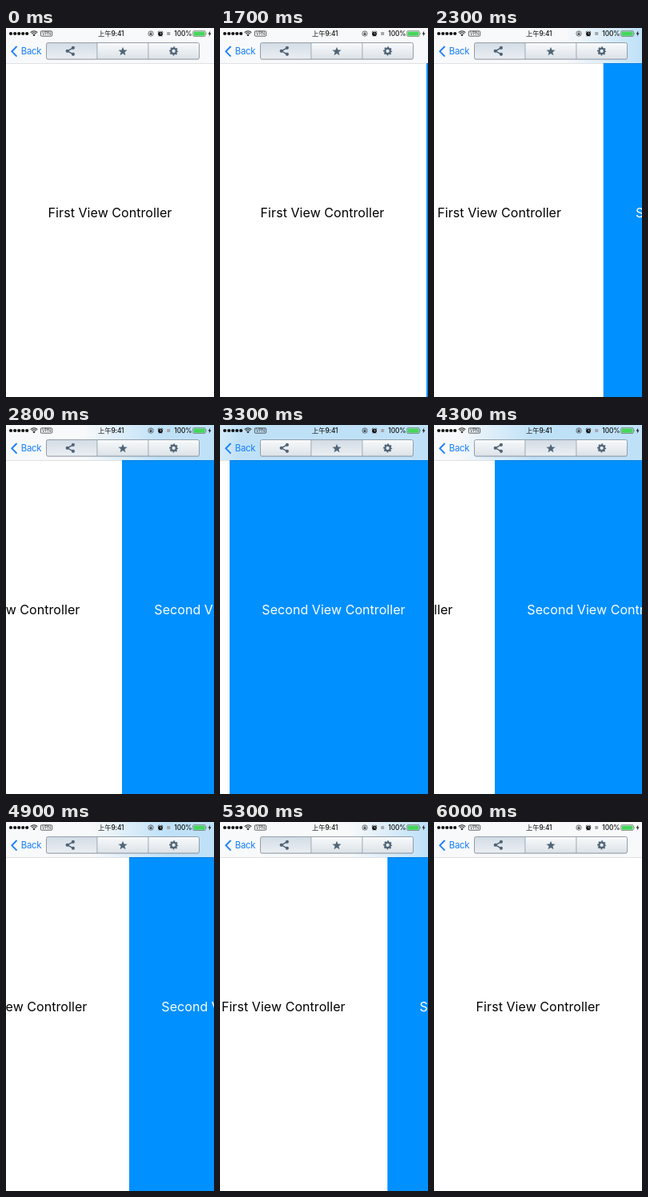
These frames come from a looping animation (260x462 px, 6300 ms). An HTML page:

```html
<!DOCTYPE html>
<html lang="en">
<head>
<meta charset="utf-8">
<title>Swipe between view controllers</title>
<style>
  html, body { margin: 0; width: 100%; height: 100%; overflow: hidden; background: #fff; }
  svg { display: block; width: 260px; height: 462px; }
  text { font-family: Inter, "Noto Sans CJK SC", "Noto Sans CJK", sans-serif; }
  .title { font-size: 16px; letter-spacing: .06px; text-anchor: middle; }
  .status { font-size: 8.3px; font-weight: 500; letter-spacing: -.1px; fill: #111; }
  .vpn { font-size: 5.6px; letter-spacing: -.1px; text-anchor: middle; fill: #333; }
  .back { font-size: 11.3px; letter-spacing: -.2px; fill: #147efb; }
  .icon { fill: #4f6477; stroke: #4f6477; stroke-width: 0; }
  .line { fill: none; stroke: #222; stroke-width: .8; }
</style>
</head>
<body>
<svg viewBox="0 0 260 462">
  <defs>
    <linearGradient id="tint" gradientUnits="userSpaceOnUse" x1="260" x2="308" y1="0" y2="0">
      <stop offset="0" stop-color="#f8f9fa"/>
      <stop offset="1" stop-color="#bfe1f8"/>
    </linearGradient>
    <linearGradient id="button" x2="0" y2="1">
      <stop offset="0" stop-color="#f8fafb"/>
      <stop offset="1" stop-color="#dce2e8"/>
    </linearGradient>
    <linearGradient id="pressed" x2="0" y2="1">
      <stop offset="0" stop-color="#d3dce5"/>
      <stop offset="1" stop-color="#ebeff3"/>
    </linearGradient>
  </defs>

  <rect width="260" height="462" fill="#fff"/>
  <g id="pages" transform="translate(0 0)">
    <text class="title" x="130" y="237.4">First View Controller</text>
    <rect x="260" width="260" height="462" fill="#0090ff"/>
    <text class="title" x="390" y="237.4" fill="#fff">Second View Controller</text>
  </g>

  <rect width="260" height="44" fill="url(#tint)"/>
  <rect y="44" width="260" height=".6" fill="#000" opacity=".2"/>

  <!-- status bar -->
  <g fill="#111">
    <circle cx="6" cy="7" r="2.1"/><circle cx="11.2" cy="7" r="2.1"/>
    <circle cx="16.2" cy="7" r="2.1"/><circle cx="21.2" cy="7" r="2.1"/>
    <circle cx="26.2" cy="7" r="2.1"/>
    <path d="M33.3 8.4Q35 7 36.7 8.4L35 10.2Z"/>
  </g>
  <path class="line" style="stroke-width:1.1" d="M30.7 5.7Q35 1.9 39.3 5.7M32.1 7.2Q35 4.7 37.9 7.2"/>
  <rect class="line" x="43.4" y="3.8" width="14.2" height="6.4" rx="1" style="stroke-width:.7"/>
  <text class="vpn" x="50.5" y="9.05">VPN</text>
  <text class="status" x="131.2" y="10.3" text-anchor="middle">上午9:41</text>
  <circle class="line" cx="181" cy="7" r="3.2" style="stroke-width:.6"/>
  <path d="M179.6 6.7h2.8v1.9h-2.8z" fill="#222"/>
  <path class="line" d="M180.1 6.8v-.9a.9 .9 0 0 1 1.8 0v.9" style="stroke-width:.5"/>
  <circle cx="193" cy="7.3" r="2.9" fill="#111"/>
  <path class="line" d="M189.7 5.4l1.8-1.7M196.3 5.4l-1.8-1.7M191 10.5l.7-.9M195 10.5l-.7-.9"/>
  <path d="M193 5.4v2h1.5" fill="none" stroke="#fff" stroke-width=".6"/>
  <rect x="201.2" y="5" width="4" height="4" fill="#a5a8ab"/>
  <text class="status" x="210.3" y="10.2">100%</text>
  <rect x="233.7" y="3.6" width="15.6" height="6.9" rx="1.3" fill="none" stroke="#555" stroke-width=".6"/>
  <rect x="234.5" y="4.4" width="14" height="5.3" rx=".7" fill="#45d65c"/>
  <path d="M250 5.8q1.2 1.2 0 2.5z" fill="#555"/>
  <path d="M255.3 3.4l-2.6 4.1h1.7l-.7 3.1 2.8-4.2h-1.8z" fill="#111"/>

  <!-- navigation bar -->
  <path d="M13.5 23L7.3 29.3l6.2 6.3" fill="none" stroke="#147efb" stroke-width="1.8"/>
  <text class="back" x="18.7" y="33.4">Back</text>

  <rect x="50.5" y="19.5" width="191" height="20.5" rx="2" fill="#000" opacity=".12"/>
  <rect x="50.5" y="18.5" width="191" height="20.5" rx="2" fill="url(#button)"/>
  <rect id="segment" x="50.5" y="18.5" width="63.5" height="20.5" rx="1" fill="url(#pressed)"/>
  <path d="M113.9 18.5V39M177.9 18.5V39" stroke="#98a2ad" stroke-width=".9"/>
  <rect x="50.5" y="18.5" width="191" height="20.5" rx="2" fill="none" stroke="#8b96a2" stroke-width=".9"/>

  <g class="icon" transform="translate(80.3 28.8)">
    <path d="M3.5-4L-3.5 0l7 4" fill="none" style="stroke-width:1.5"/>
    <circle cx="3.6" cy="-4" r="2.1"/><circle cx="-3.6" r="2.1"/><circle cx="3.6" cy="4" r="2.1"/>
  </g>
  <path id="star" class="icon" transform="translate(146 29.6)"/>
  <g class="icon" transform="translate(209.6 28.9)">
    <circle r="3.3" fill="none" style="stroke-width:2.3"/>
    <circle r="4.7" fill="none" style="stroke-width:1.8" stroke-dasharray="1.9 1.79" stroke-dashoffset=".95"/>
  </g>
</svg>
<script>
  const LOOP = 6300, STEP = 100, WIDTH = 260, BLUR = 48;
  const $ = id => document.getElementById(id);
  const pages = $('pages'), tint = $('tint'), segment = $('segment');

  // time in ms, left edge of the second page
  const drag = [
    [0, 260], [1600, 260], [1700, 258], [2800, 145], [3300, 12], [3600, 0],
    [3700, 3], [4300, 76], [4900, 154], [5500, 236], [5700, 260], [LOOP, 260]
  ];

  const slope = i => (drag[i + 1][1] - drag[i][1]) / (drag[i + 1][0] - drag[i][0]);

  // harmonic mean of neighbouring slopes: smooth without overshoot
  function tangent(i) {
    if (i === 0 || i === drag.length - 1) return 0;
    const a = slope(i - 1), b = slope(i);
    return a * b > 0 ? 2 * a * b / (a + b) : 0;
  }

  function edgeAt(t) {
    const i = drag.findIndex((p, k) => t < drag[k + 1][0]);
    const [t0, x0] = drag[i], [t1, x1] = drag[i + 1];
    const d = t1 - t0, u = (t - t0) / d, v = 1 - u;
    return v * v * (1 + 2 * u) * x0 + u * v * v * d * tangent(i)
         + u * u * (3 - 2 * u) * x1 - u * u * v * d * tangent(i + 1);
  }

  function starPath(outer, inner) {
    const points = Array.from({ length: 10 }, (_, i) => {
      const r = i % 2 ? inner : outer, a = i * Math.PI / 5;
      return `${r * Math.sin(a)} ${-r * Math.cos(a)}`;
    });
    return `M${points.join('L')}Z`;
  }

  function draw() {
    const t = performance.now() % LOOP;
    const x = edgeAt(Math.floor(t / STEP) * STEP);
    pages.setAttribute('transform', `translate(${x - WIDTH} 0)`);
    // the bar blurs only what is on the stage
    tint.setAttribute('x1', x - Math.min(BLUR, WIDTH - x));
    tint.setAttribute('x2', x + Math.min(BLUR, x));
    segment.setAttribute('x', x < WIDTH / 2 ? 114 : 50.5);
    requestAnimationFrame(draw);
  }

  $('star').setAttribute('d', starPath(5.9, 2.5));
  draw();
</script>
</body>
</html>
```
